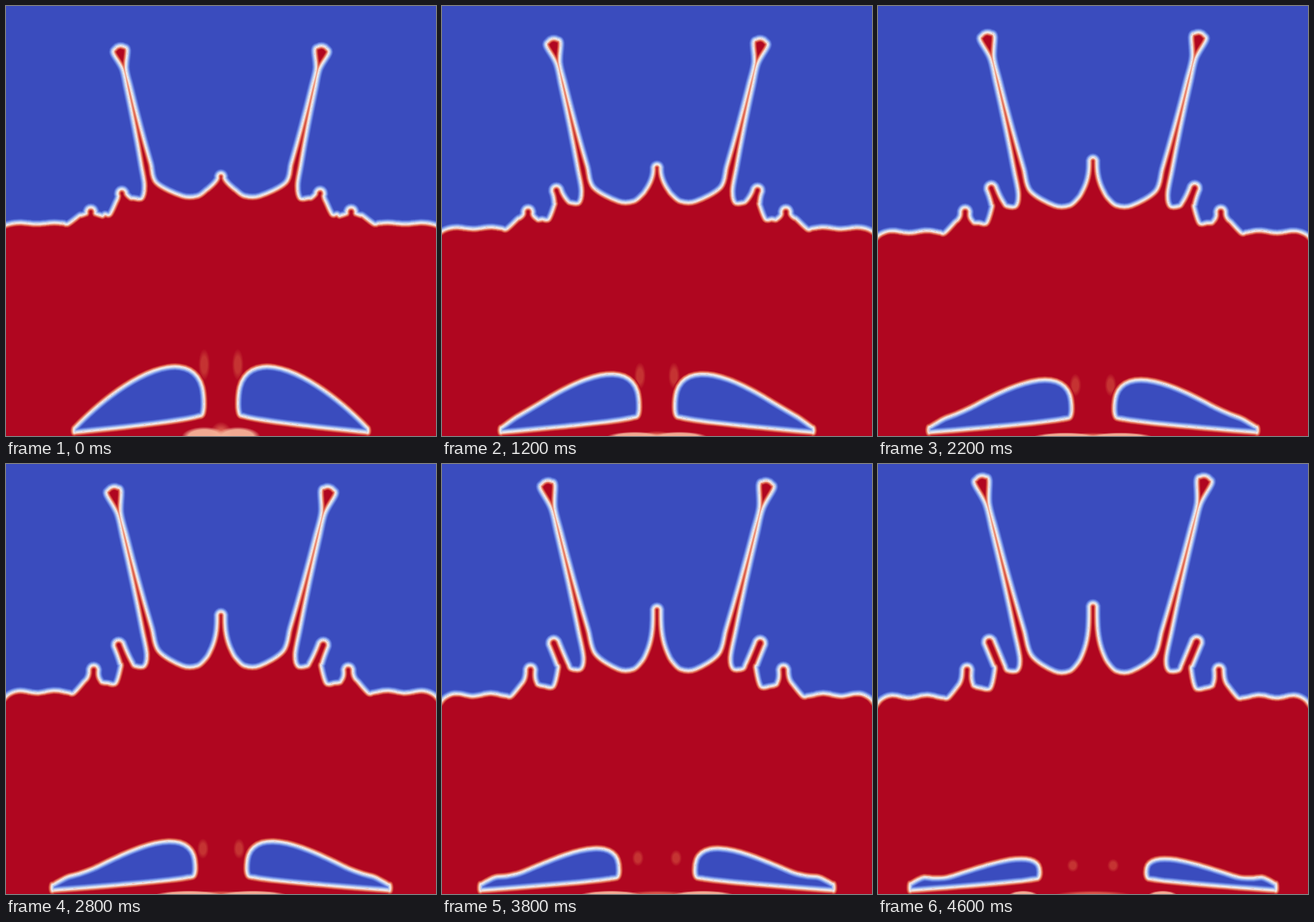
An HTML page with a canvas that plays this animation: 512 px wide and 512 px high, repeating every 4800 ms.

```html
<!DOCTYPE html>
<html lang="en">
<head>
<meta charset="utf-8">
<title>Splash simulation</title>
<style>
html, body { margin: 0; width: 100%; height: 100%; overflow: hidden; background: #3a4cbe; }
canvas { display: block; width: 100vw; height: 100vh; }
</style>
</head>
<body>
<canvas id="stage" width="512" height="512"></canvas>
<script>
const ctx = document.getElementById('stage').getContext('2d');
const SIZE = 512, LOOP = 4800, STEP = 200;
const BLUE = [58, 76, 190], RED = [176, 6, 32], PALE = [238, 234, 236];
const OUTER = [BLUE, [104, 134, 228], [188, 206, 240], PALE];
const INNER = [RED, [216, 86, 66], [244, 176, 152], PALE];

const lerp = (a, b, k) => a + (b - a) * k;
const rgb = c => `rgb(${c.map(Math.round)})`;
const mirror = pts => pts.map(([x, y]) => [SIZE - x, y]).reverse();
const range = (n, f) => Array.from({ length: n + 1 }, (_, i) => f(i / n));

function ramp(stops, k) {
  const x = k * (stops.length - 1);
  const i = Math.min(Math.floor(x), stops.length - 2);
  return rgb(stops[i].map((v, j) => lerp(v, stops[i + 1][j], x - i)));
}

// Smooth curve through all points.
function curve(path, pts, closed) {
  const n = pts.length;
  const at = i => closed ? pts[(i + n) % n] : pts[Math.max(0, Math.min(n - 1, i))];
  path.moveTo(...pts[0]);
  for (let i = 0; i < (closed ? n : n - 1); i++) {
    const [a, b, c, d] = [at(i - 1), at(i), at(i + 1), at(i + 2)];
    path.bezierCurveTo(
      b[0] + (c[0] - a[0]) / 6, b[1] + (c[1] - a[1]) / 6,
      c[0] - (d[0] - b[0]) / 6, c[1] - (d[1] - b[1]) / 6, c[0], c[1]);
  }
}

// A jet: a stem that narrows from its foot to a neck, with a round drop on top.
function jet({ foot, ball, r, half, neck = r, gap = 2, flare = 3 }) {
  const dx = ball[0] - foot[0], dy = ball[1] - foot[1];
  const len = Math.hypot(dx, dy), ux = dx / len, uy = dy / len;
  const put = (along, side) =>
    [foot[0] + ux * along - uy * side, foot[1] + uy * along + ux * side];
  const stem = side => range(6, s =>
    put(s * (len - gap), side * lerp(neck, half, (1 - s) ** flare)));
  const drop = range(4, s => {
    const a = lerp(-1.4, 1.4, s);
    return put(len + r * Math.cos(a), r * Math.sin(a));
  });
  return [...stem(-1), ...drop, ...stem(1).reverse()];
}

const valley = (x, y, w) => [[x - w, y], [x + w, y]];

function surface(u) {
  const k = 1 - (1 - u) ** 1.25;
  const go = (a, b) => lerp(a, b, k);
  const flare = go(1.4, 3);
  const shore = range(14, s => {
    const x = lerp(-4, go(74, 84), s);
    const ripple = go(0.8, 1.8) * Math.cos((x - 16) * Math.PI / 21);
    return [x, go(259, 277) - ripple + go(1.5, 6) * Math.exp(-x / 6)];
  });
  const left = [
    ...shore,
    ...jet({ foot: [go(101, 105), go(250, 264)], ball: [go(101, 106), 245],
      r: 5.3, half: go(14, 9), flare }),
    ...valley(go(121, 128), go(248, 267), go(3, 6)),
    ...jet({ foot: [go(140, 145), go(231, 242)], ball: [go(138, 132.5), go(223, 212)],
      r: go(5, 6), half: go(9, 6), flare }),
    ...valley(go(157, 160), go(229, 246), go(5, 6)),
    ...jet({ foot: [go(172, 176), go(212, 230)], ball: [lerp(136.5, 124, u), lerp(56, 23, u)],
      r: go(8.5, 9), half: 7, neck: 2, gap: go(19, 25), flare: 2 }),
    ...valley(219, go(226.5, 247), 9)
  ];
  const spike = jet({ foot: [256, go(219, 236)], ball: [256, go(203, 170)],
    r: go(4, 4.5), half: 17, flare });
  return [...left, ...spike, ...mirror(left)];
}

// Upper and lower edges are offsets from the line between tail and nose.
function cavity(u) {
  const tail = 81 - 43 * u, nose = 236 - 43 * u ** 2.9;
  const height = 119 - 40 * u - 27 * u ** 8;
  const edge = offset => range(14, v => {
    const q = (1 - Math.cos(Math.PI * v)) / 2;
    return [lerp(tail, nose, q), lerp(503, 474 + 12 * u, q) + offset(q)];
  });
  const top = edge(q => -height * q ** lerp(0.95, 1.6, u) * (1 - q) ** 0.4
    - 8 * u * Math.exp(-(((q - 0.1) / 0.1) ** 2)));
  const bottom = edge(q => (5 + lerp(14, 6, u) * q) * (1 - q) ** 0.1);
  return [...top, ...bottom.reverse().slice(1)];
}

function outline(u) {
  const path = new Path2D();
  curve(path, surface(u), false);
  path.lineTo(540, 540);
  path.lineTo(-28, 540);
  path.closePath();
  const hole = cavity(u);
  curve(path, hole, true);
  curve(path, mirror(hole), true);
  return path;
}

// Nested strokes give a colour that depends on the distance to the edge.
function glow(path, stops, reach) {
  for (let d = reach; d > 0; d -= 0.5) {
    ctx.lineWidth = d * 2;
    ctx.strokeStyle = ramp(stops, 1 - d / reach);
    ctx.stroke(path);
  }
}

function spot(x, y, rx, ry, color, alpha, core) {
  ctx.save();
  ctx.translate(x, y);
  ctx.scale(rx, ry);
  const g = ctx.createRadialGradient(0, 0, 0, 0, 0, 1);
  g.addColorStop(0, `rgba(${color},${alpha})`);
  g.addColorStop(core, `rgba(${color},${alpha})`);
  g.addColorStop(1, `rgba(${color},0)`);
  ctx.fillStyle = g;
  ctx.fillRect(-1, -1, 2, 2);
  ctx.restore();
}

function twin(x, ...rest) {
  spot(x, ...rest);
  spot(SIZE - x, ...rest);
}

function draw(t) {
  const u = t / (LOOP - STEP);
  const burst = (1 - u) ** 6;
  const path = outline(u);
  ctx.fillStyle = rgb(BLUE);
  ctx.fillRect(0, 0, SIZE, SIZE);
  ctx.lineJoin = 'round';
  glow(path, OUTER, 5.5);
  ctx.save();
  ctx.clip(path, 'evenodd');
  ctx.fillStyle = rgb(RED);
  ctx.fillRect(0, 0, SIZE, SIZE);
  twin(236 - 4 * u * u, 427 + 51 * u, 7, lerp(19, 8, u), [204, 66, 56], 0.75, 0.5);
  spot(256, 513, lerp(14, 46, u), 5 + 13 * burst, [232, 120, 92], 0.7, 0.5);
  twin(236 - 24 * u - 39 * u ** 5, 513, 27 + 25 * u - 35 * u ** 6, 5 + 7 * burst,
    [244, 178, 152], 0.95, 0.7);
  glow(path, INNER, 4.5);
  ctx.restore();
  // Covers the seam left by the clip.
  ctx.lineWidth = 1.2;
  ctx.strokeStyle = rgb(PALE);
  ctx.stroke(path);
}

let shown = -1;
function frame(now) {
  const t = Math.floor(now % LOOP / STEP) * STEP;
  if (t !== shown) draw(shown = t);
  requestAnimationFrame(frame);
}
draw(0);
requestAnimationFrame(frame);
</script>
</body>
</html>
```
